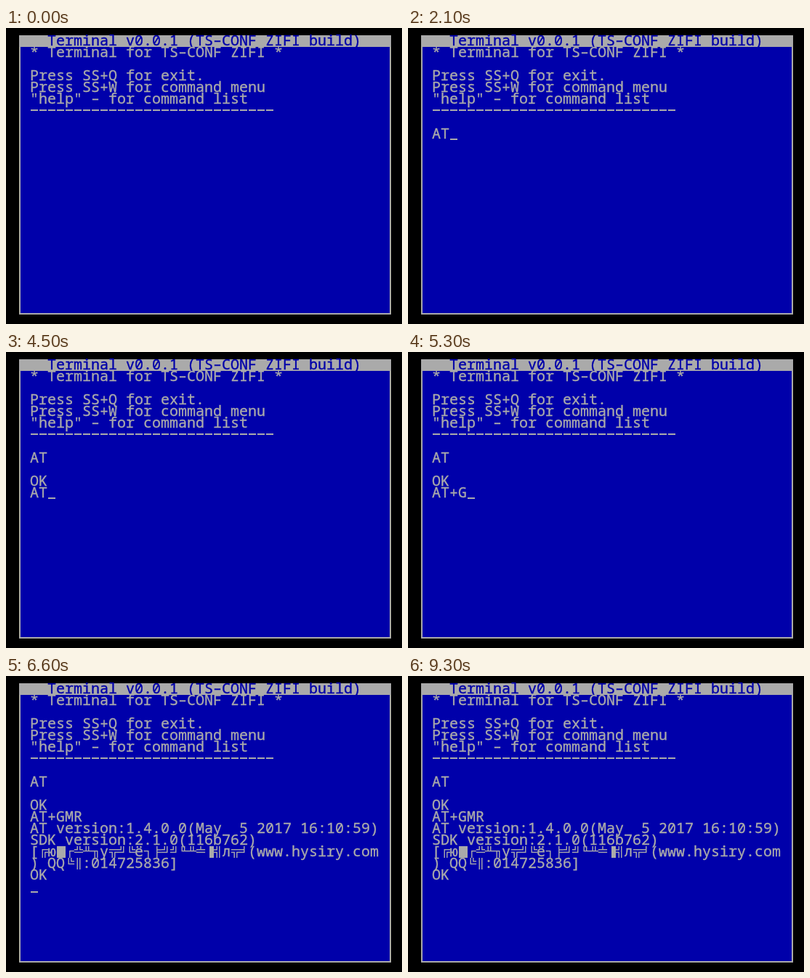
These frames come from a looping animation (545x407 px, 9400 ms). An HTML page:

```html
<!DOCTYPE html>
<html lang="en">
<head>
<meta charset="utf-8">
<title>Terminal</title>
<style>
  html, body { margin: 0; width: 100%; height: 100%; overflow: hidden; background: #000; }
  svg { display: block; }
  text { font: 20px "Noto Sans Mono", "DejaVu Sans Mono", monospace; white-space: pre; font-variant-ligatures: none; }
  .plain { stroke: currentColor; stroke-width: .35px; fill: currentColor; }
</style>
</head>
<body>
<svg id="stage" width="545" height="407" viewBox="0 0 545 407">
  <rect width="545" height="407" fill="#000"/>
  <rect x="18" y="10" width="512" height="384" fill="#aaa"/>
  <rect x="20" y="26" width="508" height="366" fill="#00a"/>
  <text class="plain" x="57" y="24" color="#00a">Terminal v0.0.1 (TS–CONF ZIFI build)</text>
  <path d="M34 113H370" stroke="#aaa" stroke-width="2" stroke-dasharray="10 2"/>
  <g id="screen" fill="#aaa" color="#aaa"></g>
  <rect id="cursor" width="10" height="2" fill="#aaa"/>
</svg>
<script>
const LOOP = 9400, LEFT = 34, TOP = 26, CELL_W = 12, CELL_H = 16, ROWS = 17;
const NS = 'http://www.w3.org/2000/svg';

// Everything printed on the screen, in order: [time, text]
const output = [
  [0, `* Terminal for TS–CONF ZIFI *

Press SS+Q for exit.
Press SS+W for command menu
"help" – for command list


`],
  [1000, 'A'], [1300, 'T'], [2400, '\n\nOK\n'],
  [3800, 'A'], [4100, 'T'], [5200, '+'], [5300, 'G'], [5600, 'M'], [5700, 'R'],
  [6500, '\nAT version'],
  [6600, `:1.4.0.0(May  5 2017 16:10:59)
SDK version:2.1.0(116b762)
[╔ю█┌╩╨╖у╦╝╚ё┐╞╝╝╙╨╧▐╣л╦╛(www.hysiry.com
) QQ╚║:014725836]
OK
`],
];

// Times at which the cursor switches on or off, starting from off
const blinks = [
  200, 400, 700, 900, 1200, 1400, 1600, 1800, 2100, 2300,
  3000, 3300, 3500, 3700, 4000, 4200, 4500, 4700, 5000, 5400, 5500,
  6000, 6200, 6500, 6600, 6900, 7100, 7400, 7600, 7900, 8100, 8400,
  8700, 8900, 9000, 9300,
];

function add(parent, tag, attrs) {
  const node = document.createElementNS(NS, tag);
  for (const name in attrs) node.setAttribute(name, attrs[name]);
  return parent.appendChild(node);
}

// Letters lean to the left of their cell; box-drawing characters fill it,
// so they sit in their own layer, clipped to the row height
const screenGroup = document.getElementById('screen');
const rows = Array.from({ length: ROWS }, (_, i) => {
  const y = TOP + i * CELL_H;
  const clip = add(screenGroup, 'svg', { x: LEFT, y, width: 480, height: CELL_H, overflow: 'hidden' });
  return {
    plain: add(screenGroup, 'text', { class: 'plain', x: LEFT - 1, y: y + 14 }),
    boxes: add(clip, 'text', { x: 0, y: 14 }),
  };
});
const cursor = document.getElementById('cursor');
let shown = null;

function print(text) {
  if (text === shown) return;
  shown = text;
  const lines = text.split('\n');
  rows.forEach((row, i) => {
    const line = lines[i] || '';
    row.plain.textContent = line.replace(/[\u2500-\u259f]/g, ' ');
    row.boxes.textContent = line.replace(/[^\u2500-\u259f]/g, ' ');
  });
  const last = lines.length - 1;
  cursor.setAttribute('x', LEFT + lines[last].length * CELL_W);
  cursor.setAttribute('y', TOP + last * CELL_H + 14);
}

function render(time) {
  print(output.filter(([at]) => at <= time).map(([, text]) => text).join(''));
  const on = blinks.filter(at => at <= time).length % 2;
  cursor.setAttribute('visibility', on ? 'visible' : 'hidden');
}

const start = performance.now();
function tick() {
  render((performance.now() - start) % LOOP);
  requestAnimationFrame(tick);
}
tick();
</script>
</body>
</html>
```
